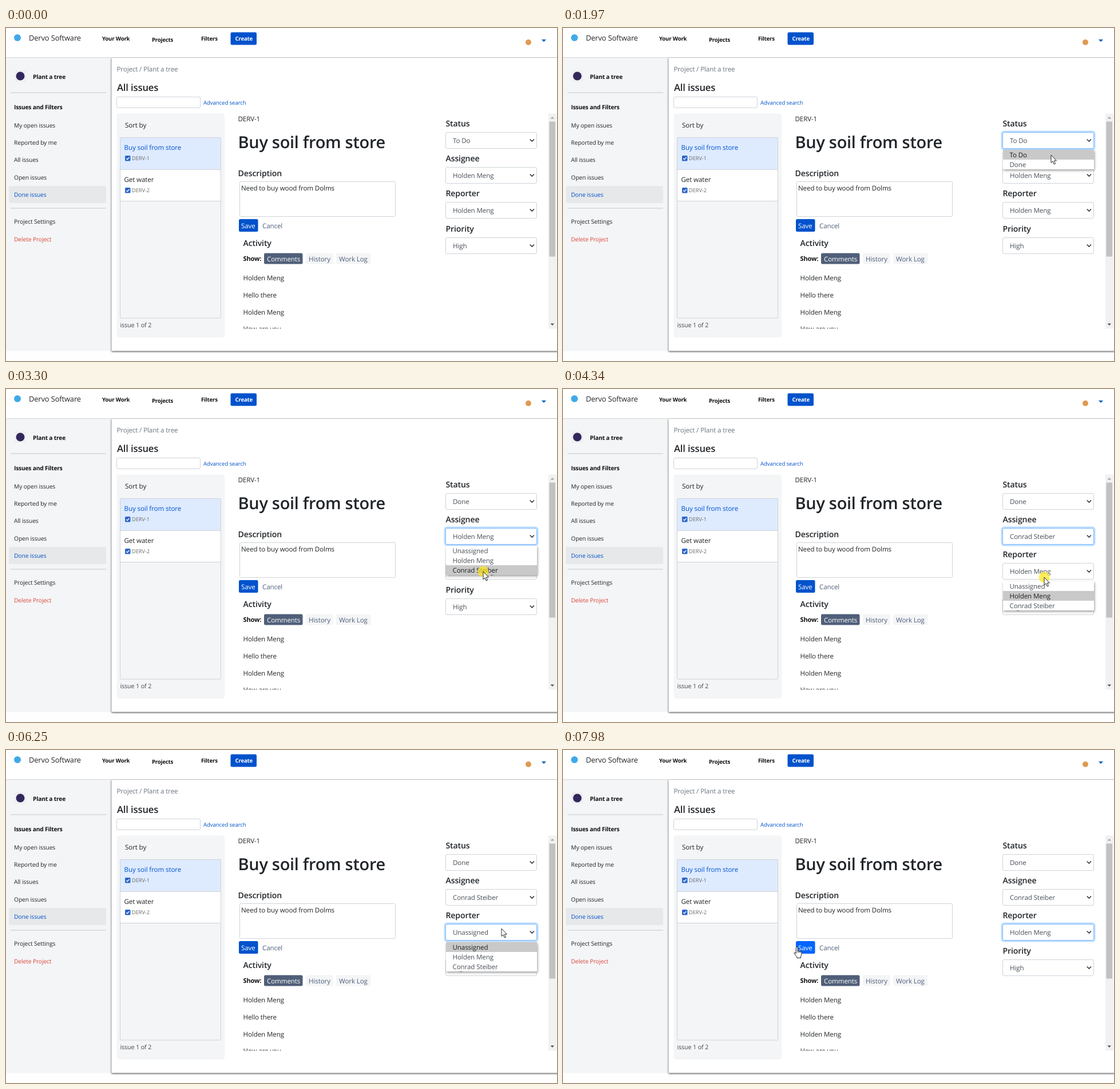
Recreate the animation shown at these times as an HTML page. Size 963 by 582 pixels, loop 8000 ms.

```html
<!DOCTYPE html>
<html lang="en">
<head>
<meta charset="utf-8">
<title>Issue tracker</title>
<style>
  html, body { margin: 0; width: 100%; height: 100%; overflow: hidden; background: #fff; }
  svg { display: block; width: 100%; height: 100%; }
  text { font-family: "Open Sans", "Noto Sans", sans-serif; letter-spacing: -.01em; fill: #212529; text-rendering: geometricPrecision; white-space: pre; }
  .nav text { font-size: 9.65px; }
  .side text { font-size: 10.25px; }
  .b { font-weight: 700; letter-spacing: -.02em; fill: #111; }
  .h { font-weight: 600; font-size: 14.1px; }
  .m { font-size: 11.6px; }
  .key { font-size: 9.3px; fill: #6b6b6b; }
  .blue { fill: #0052cc; }
  .grey { fill: #505f79; }
  .white { fill: #fff; }
  .field { fill: #fff; stroke: #ced4da; }
  .val, .opt { font-size: 11.6px; fill: #495057; }
  .opt.on { fill: #1c1f22; }
  .ring { fill: none; stroke: #007bff; stroke-opacity: .27; stroke-width: 2.5; visibility: hidden; }
  .focus .field { stroke: #80bdff; }
  .focus .ring { visibility: visible; }
  .chev { fill: none; stroke: #343a40; stroke-width: 1.7; }
  #main { filter: drop-shadow(0 1.3px 1.6px rgba(0, 0, 0, .8)); }
  #head { filter: drop-shadow(0 .5px .8px rgba(0, 0, 0, .4)); }
  #list { filter: drop-shadow(1px 2px 2px rgba(0, 0, 0, .4)); }
</style>
</head>
<body>
<svg viewBox="0 0 963 582" preserveAspectRatio="none">
  <defs>
    <clipPath id="pane"><rect x="394" y="149" width="554" height="376.5"/></clipPath>
    <g id="check">
      <rect width="9.5" height="9.5" rx="1.5" fill="#2c66c8"/>
      <path d="M2.2 4.9l1.9 1.9 3.4-3.9" fill="none" stroke="#fff" stroke-width="1.3"/>
    </g>
  </defs>
  <rect width="963" height="582" fill="#fefefe"/>
  <rect y="52" width="184" height="512.5" fill="#f4f5f7"/>
  <rect id="main" x="184.5" y="52" width="800" height="512.5" fill="#fff"/>
  <rect id="head" x="-5" y="-5" width="973" height="56" fill="#fff"/>

  <g class="nav">
    <circle cx="20" cy="17" r="6" fill="#3fa9e8"/>
    <text x="40" y="22" style="font-size:12.9px">Dervo Software</text>
    <text class="b" x="168" y="22">Your Work</text>
    <text class="b" x="255" y="24">Projects</text>
    <text class="b" x="341" y="22">Filters</text>
    <rect x="392.5" y="7.5" width="45.5" height="22" rx="2.5" fill="#0052cc"/>
    <text class="b white" x="400.5" y="22">Create</text>
    <circle cx="913" cy="25" r="5" fill="#e09a52"/>
    <path d="M936 20h8l-4 4.3z" fill="#0065c8"/>
  </g>

  <g class="side">
    <rect x="15" y="74" width="20" height="20" rx="2" fill="#efeff1"/>
    <circle cx="25" cy="84" r="7.5" fill="#33285c"/>
    <text class="b" x="47" y="89">Plant a tree</text>
    <path d="M8 113h167M8 315h167" stroke="#d5d7db" stroke-width="1.5"/>
    <text class="b" x="14" y="142">Issues and Filters</text>
    <text x="14" y="174">My open issues</text>
    <text x="14" y="204">Reported by me</text>
    <text x="14" y="234">All issues</text>
    <text x="14" y="264.5">Open issues</text>
    <rect x="5" y="276" width="170" height="30" rx="2.5" fill="#e7e8ea"/>
    <text class="blue" x="14" y="295">Done issues</text>
    <text x="14" y="342">Project Settings</text>
    <text x="14" y="372.5" style="fill:#d9483b">Delete Project</text>
  </g>

  <text class="m" x="193.5" y="76" style="fill:#6b7480">Project / Plant a tree</text>
  <text class="h" x="194" y="109.5" style="font-size:16.7px">All issues</text>
  <rect class="field" x="193.5" y="120.5" width="146" height="19" rx="2.5"/>
  <text class="blue" x="345" y="134" style="font-size:9.65px">Advanced search</text>

  <rect x="193.5" y="149.5" width="188.5" height="391.5" rx="4" fill="#f4f5f7"/>
  <text x="208" y="174" class="m">Sort by</text>
  <path d="M249.5 167h6l-3 3z" fill="#fff"/>
  <rect x="199.5" y="191.5" width="176" height="56" fill="#deebff"/>
  <rect x="199.5" y="247.5" width="176" height="55" fill="#fff"/>
  <path d="M199.5 247.5h176M199.5 302.5h176" stroke="#cfd2d6"/>
  <rect x="199.5" y="191.5" width="176" height="315.5" rx="1.5" fill="none" stroke="#cfd2d6"/>
  <text class="m blue" x="206.5" y="213">Buy soil from store</text>
  <use href="#check" x="208" y="223"/>
  <text class="key" x="220" y="230.5">DERV-1</text>
  <text class="m" x="206.5" y="269">Get water</text>
  <use href="#check" x="208" y="279"/>
  <text class="key" x="220" y="286.5">DERV-2</text>
  <text x="199.5" y="523" style="font-size:10.7px;fill:#42474d">issue 1 of 2</text>

  <g clip-path="url(#pane)">
    <text class="m" x="405.5" y="162.5">DERV-1</text>
    <text class="h" x="405.5" y="209.5" style="font-size:28.95px">Buy soil from store</text>
    <text class="h" x="405.5" y="258.5">Description</text>
    <rect class="field" x="408.5" y="268.5" width="272" height="61" rx="2"/>
    <text class="m" x="411" y="284">Need to buy wood from Dolms</text>
    <rect id="save" x="407" y="334" width="33.5" height="22" rx="2.5"/>
    <text class="m white" x="411" y="350">Save</text>
    <text class="m grey" x="448" y="350">Cancel</text>
    <text class="h" x="414.5" y="381">Activity</text>
    <text class="m b" x="414.5" y="407" style="font-size:11.1px">Show:</text>
    <rect x="451" y="393.5" width="67.5" height="19" rx="2.5" fill="#505f79"/>
    <text class="m white" x="456" y="408">Comments</text>
    <rect x="524" y="393.5" width="47.5" height="19" rx="2.5" fill="#f4f5f7"/>
    <text class="m grey" x="529" y="408">History</text>
    <rect x="577" y="393.5" width="60.5" height="19" rx="2.5" fill="#f4f5f7"/>
    <text class="m grey" x="582" y="408">Work Log</text>
    <text class="m" x="414.5" y="441">Holden Meng</text>
    <text class="m" x="414.5" y="471">Hello there</text>
    <text class="m" x="414.5" y="500.5">Holden Meng</text>
    <text class="m" x="414.5" y="530">How are you</text>
  </g>

  <rect x="948" y="149.5" width="14" height="376" fill="#f1f1f1"/>
  <rect x="949.5" y="163.5" width="10.5" height="236" fill="#c1c1c1"/>
  <path d="M951.5 158.5h6.6l-3.3-3.6z" fill="#a3a3a3"/>
  <path d="M951.5 516.5h6.6l-3.3 3.6z" fill="#505050"/>

  <g id="fields"></g>
  <g id="list"></g>

  <g id="pointer">
    <circle id="halo" r="9.5" fill="#ffe61a" opacity=".72"/>
    <path id="arrow" d="M0 0V13.6L3.1 10.8 5.2 16.1 7.5 15.1 5.3 10H9.4Z" fill="#fff" stroke="#111" stroke-width=".9"/>
    <g id="hand" fill="#fff" stroke="#111" stroke-width=".95" stroke-linejoin="round">
      <path d="M-.7 1.6a1.5 1.5 0 0 1 3 0V6.6l5.2 1.2q1.9.5 1.7 2.6L8.5 14.5l-1 2.3v2.6H.8V17.5L-3.6 12q-.9-1.5.2-2.1 1-.4 2.7 1.7Z"/>
      <path d="M2.3 6.5v3.5M4.7 7.2v3M7 7.8v2.8" fill="none"/>
    </g>
  </g>
</svg>

<script>
  const LOOP = 8000, FIRST = 370, TICK = 79.17;
  const $ = id => document.getElementById(id);
  const people = ["Unassigned", "Holden Meng", "Conrad Steiber"];
  const fields = [
    { label: "Status", y: 182, listY: 213, options: ["To Do", "Done"] },
    { label: "Assignee", y: 243, listY: 274, options: people },
    { label: "Reporter", y: 304, listY: 336, options: people },
    { label: "Priority", y: 366, options: ["High"] }
  ];
  const ROW = 17;

  // Pointer stops: [tick, x, y]
  const stops = [
    [0, 769, 566], [10, 544, 229], [11, 544, 229], [17, 858, 200], [18, 858, 201],
    [20, 853, 222], [22, 848, 240], [25, 848, 240], [30, 852, 258], [32, 851, 262],
    [37, 834, 319], [38, 834, 319], [43, 743, 364], [50, 841, 329], [51, 841, 330],
    [54, 838, 373], [57, 838, 347], [58, 838, 347], [59, 839, 369], [61, 837, 345],
    [68, 837, 345], [73, 867, 312], [74, 866, 312], [76, 837, 358], [77, 836, 357],
    [80, 836, 357], [89, 491, 415], [94, 409, 347], [95, 409, 347], [96, 408, 344]
  ];
  const clicks = [17, 23, 30, 37, 50, 67, 73, 79];
  const openings = [[17, 24, 0], [30, 38, 1], [50, 68, 2], [73, 80, 2]];

  $("fields").innerHTML = fields.map(f => `<g>
    <text class="h" x="768.5" y="${f.y - 10}">${f.label}</text>
    <rect class="field" x="768.5" y="${f.y + .5}" width="159" height="28" rx="2.5"/>
    <rect class="ring" x="766.75" y="${f.y - 1.25}" width="162.5" height="31.5" rx="4"/>
    <text class="val" x="781" y="${f.y + 19.3}"></text>
    <path class="chev" d="M915.8 ${f.y + 12.5}l3.6 3.6 3.6-3.6"/></g>`).join("");
  const groups = [...$("fields").children];

  function pointerAt(n) {
    const i = stops.findIndex(s => s[0] >= n);
    if (i < 1) return stops[i < 0 ? stops.length - 1 : 0].slice(1);
    const [n0, x0, y0] = stops[i - 1], [n1, x1, y1] = stops[i];
    const u = (n - n0) / (n1 - n0), e = u * u * (3 - 2 * u);
    return [x0 + (x1 - x0) * e, y0 + (y1 - y0) * e];
  }

  const valuesAt = n => [n < 24 ? 0 : 1, n < 38 ? 1 : 2, n >= 68 && n < 80 ? 0 : 1, 0];
  const focusAt = n => n < 18 ? -1 : n < 31 ? 0 : n < 51 ? 1 : 2;

  function listMarkup(f, chosen, y) {
    const count = f.options.length;
    const hover = Math.floor((y - f.listY) / ROW);
    const active = hover >= 0 && hover < count ? hover : chosen;
    return `<rect x="769" y="${f.listY}" width="159" height="${count * ROW}" fill="#fff"/>
      <rect x="769" y="${f.listY + active * ROW}" width="159" height="${ROW}" fill="#c9c9c9"/>` +
      f.options.map((o, i) =>
        `<text class="opt${i === active ? " on" : ""}" x="780.5" y="${f.listY + 12.5 + i * ROW}">${o}</text>`).join("");
  }

  const show = (id, on) => $(id).setAttribute("visibility", on ? "visible" : "hidden");

  function draw(n) {
    const [x, y] = pointerAt(n), values = valuesAt(n), focus = focusAt(n);
    groups.forEach((g, i) => {
      g.setAttribute("class", i === focus ? "focus" : "");
      g.querySelector(".val").textContent = fields[i].options[values[i]];
    });
    const open = openings.find(o => n >= o[0] && n < o[1]);
    $("list").innerHTML = open ? listMarkup(fields[open[2]], values[open[2]], y) : "";

    const onSave = x >= 407 && x <= 440 && y >= 334 && y <= 356;
    $("save").setAttribute("fill", onSave ? "#0065ff" : "#0052cc");
    $("pointer").setAttribute("transform", `translate(${Math.round(x)} ${Math.round(y)})`);
    const seen = n >= 0;
    show("arrow", seen && !onSave);
    show("hand", seen && onSave);
    show("halo", seen && clicks.includes(n));
  }

  let last = null;
  function frame() {
    const n = Math.floor((performance.now() % LOOP - FIRST) / TICK);
    if (n !== last) draw(last = n);
    requestAnimationFrame(frame);
  }
  frame();
</script>
</body>
</html>
```
